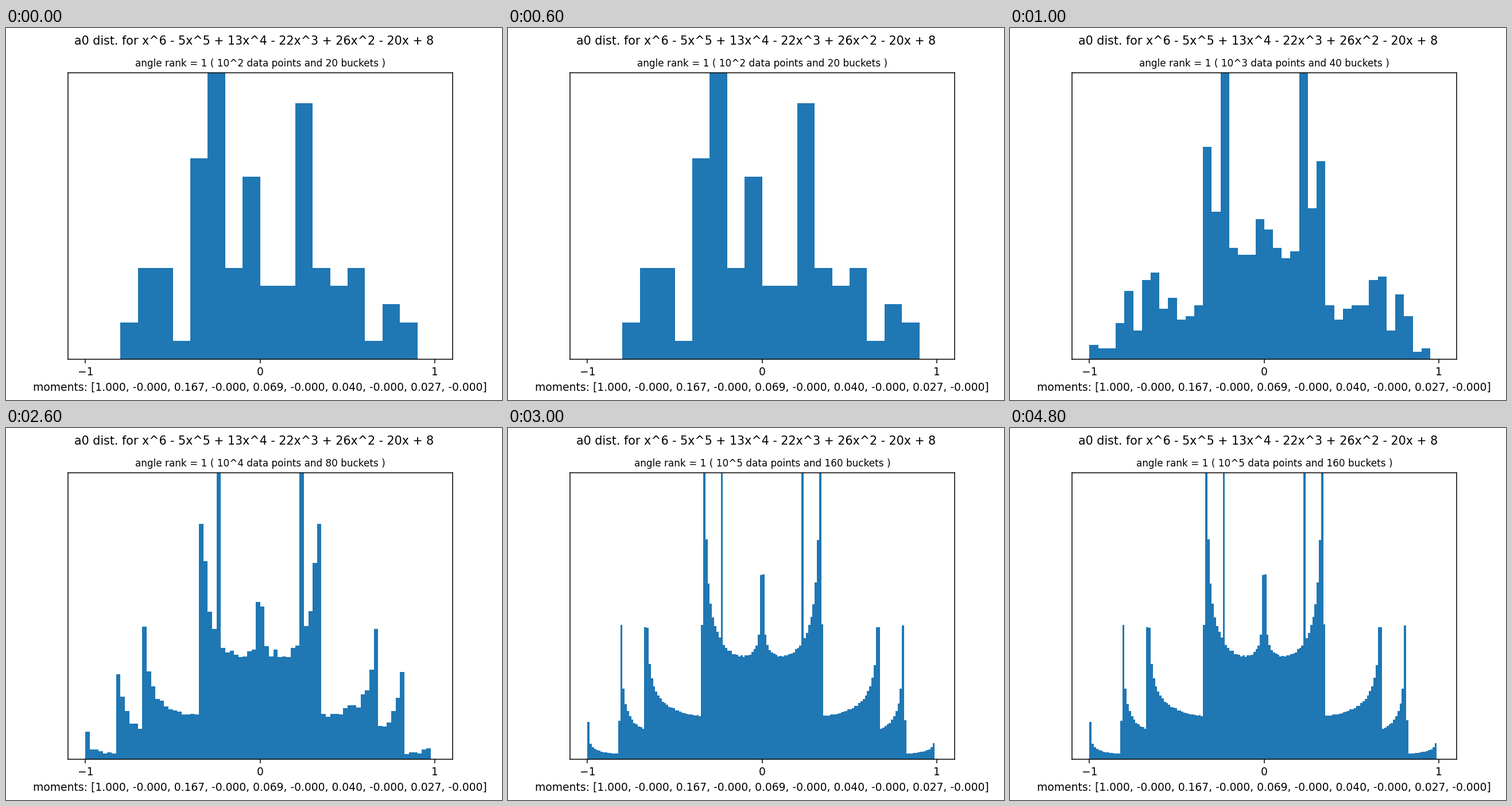
These frames come from a looping animation (864x648 px, 6 s). A matplotlib script:

```python
import matplotlib.pyplot as plt
import numpy as np
from matplotlib.animation import FuncAnimation

MOMENTS = "[1.000, -0.000, 0.167, -0.000, 0.069, -0.000, 0.040, -0.000, 0.027, -0.000]"
LAST_STEP = 3

# With y = x + 2/x the polynomial becomes (y - 2)(y^2 - 3y + 1).
REAL_ROOTS = np.array([2, (3 + np.sqrt(5)) / 2, (3 - np.sqrt(5)) / 2])
ANGLES = np.arccos(REAL_ROOTS / np.sqrt(8))


def traces(count):
    """Normalised traces of the first `count` powers of Frobenius."""
    powers = np.arange(1, count + 1)
    return np.cos(np.outer(powers, ANGLES)).mean(axis=1)


SAMPLES = traces(10 ** (LAST_STEP + 2))

fig, ax = plt.subplots(figsize=(6.4, 4.8), dpi=135)
fig.suptitle("a0 dist. for x^6 - 5x^5 + 13x^4 - 22x^3 + 26x^2 - 20x + 8", fontsize=11)


def draw(second):
    step = min(second, LAST_STEP)
    exponent, buckets = step + 2, 20 * 2 ** step
    ax.clear()
    # The bucket that ends at 1 is left out.
    edges = np.linspace(-1, 1, buckets + 1)[:-1]
    ax.hist(SAMPLES[:10 ** exponent], bins=edges, density=True, color="#1f77b4")
    ax.set(xlim=(-1.1, 1.1), ylim=(0, 1.6), xticks=[-1, 0, 1], yticks=[])
    ax.set_title(
        f"angle rank = 1 ( 10^{exponent} data points and {buckets} buckets )",
        fontsize=9,
    )
    ax.set_xlabel(f"moments: {MOMENTS}")
    return ax.patches


anim = FuncAnimation(fig, draw, frames=6, interval=1000, repeat=True, repeat_delay=0)
plt.show()
```
